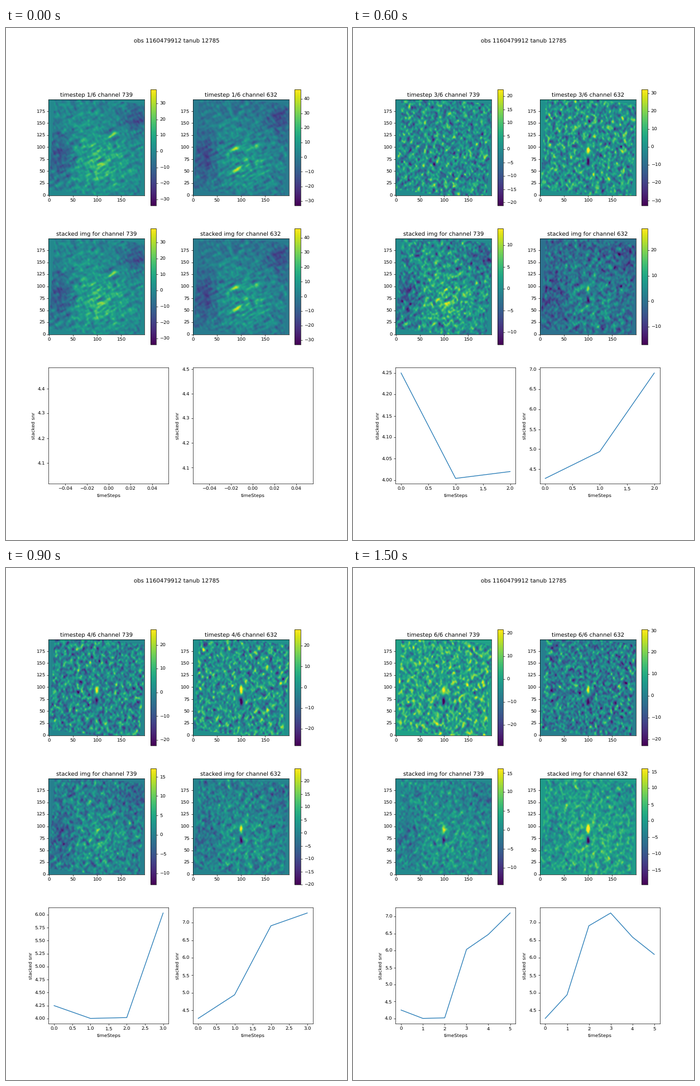
These frames come from a looping animation (611x917 px, 1800 ms). A matplotlib script:

```python
import numpy as np
import matplotlib.pyplot as plt
from matplotlib.animation import FuncAnimation

plt.rcParams["text.hinting"] = "none"

N = 200
STEPS = 6
DPI = 61.1

# Plotted ratio, colour limits of both maps, brightest streaks of the first step
CHANNELS = {
    739: dict(snr=(4.25, 4.004, 4.02, 6.031, 6.471, 7.102),
              step=((-33.8, -23.3, -21.1, -22.3, -22.8, -29.0),
                    (38.7, 19.6, 22.5, 26.5, 27.3, 21.6)),
              stack=((-33.8, -18.2, -12.8, -12.9, -12.2, -14.4),
                     (38.7, 18.5, 13.8, 17.1, 16.8, 16.2)),
              streaks=((134, 126),)),
    632: dict(snr=(4.27, 4.943, 6.91, 7.275, 6.588, 6.095),
              step=((-33.1, -25.1, -32.6, -28.1, -27.3, -22.7),
                    (46.5, 33.4, 32.2, 27.9, 24.2, 30.6)),
              stack=((-33.1, -20.2, -16.9, -20.0, -21.0, -19.4),
                     (46.5, 26.9, 28.4, 24.9, 19.6, 15.9)),
              streaks=((88, 97), (130, 101), (92, 53))),
}

yy, xx = np.mgrid[:N, :N].astype(float)

# Field of view: a slightly rotated square, zero outside
inside = ((yy > 12 - 0.125 * xx) & (xx > 0.065 * (yy - 12))
          & (yy < 189 + 0.125 * (199 - xx)) & (xx < 200 - 0.065 * (150 - yy)))


def rotate(x, y, angle):
    t = np.radians(angle)
    return x * np.cos(t) + y * np.sin(t), y * np.cos(t) - x * np.sin(t)


def bump(x, y, sx, sy, angle=0):
    u, v = rotate(xx - x, yy - y, angle)
    return np.exp(-0.5 * ((u / sx) ** 2 + (v / sy) ** 2))


def noise(rng, angle, along=3.0, across=1.6):
    """Smooth random field of unit spread, stretched along the angle."""
    f = np.fft.fftfreq(N)
    fx, fy = np.meshgrid(f, f)
    u, v = rotate(fx, fy, angle)
    band = np.exp(-2 * np.pi ** 2 * ((along * u) ** 2 + (across * v) ** 2))
    band *= 1.1 - np.exp(-(fx ** 2 + fy ** 2) / 0.03 ** 2)
    field = np.fft.ifft2(np.fft.fft2(rng.normal(size=(N, N))) * band).real
    return field / field.std()


def first_step(rng, streaks):
    """Bright glow and two dark clouds, crossed by slanted fringes."""
    glow = bump(108, 65, 42, 38)
    img = 13 * glow + 4 * bump(75, 140, 30, 25) - 2
    img -= 14 * bump(25, 80, 18, 32) + 13 * bump(180, 160, 16, 17)
    img += 3 * noise(rng, 120) + (2.5 + 4 * glow) * noise(rng, 28, 4.5, 1.9)
    for x, y in streaks:
        img += 30 * bump(x, y, 7, 2.6, 28)
        for side in (-1, 1):
            img -= 14 * bump(x - 4 * side, y + 9 * side, 7, 3, 28)
    return img


def later_step(rng, low, high, snr):
    """Crossed grain with a bright and a dark spot as strong as the ratio."""
    grain = sum(noise(rng, a) for a in (50, 90, 130)) / np.sqrt(3)
    strength = np.clip((snr - 4) / 2.3, 0, 1)
    core = strength * bump(100, 83, 6, 22)
    img = 0.125 * (high - low) * grain * (1 - 0.7 * core)
    img += 1.2 * strength * (high * bump(100, 94, 2.4, 6)
                             + low * bump(100, 71, 2.4, 6))
    return img


def make_steps(number, c):
    rng = np.random.default_rng(number)
    imgs = [first_step(rng, c["streaks"])]
    imgs += [later_step(rng, c["step"][0][k], c["step"][1][k], c["snr"][k])
             for k in range(1, STEPS)]
    return [inside * img for img in imgs]


images = {number: make_steps(number, c) for number, c in CHANNELS.items()}

fig = plt.figure(figsize=(10.0001, 15.0083), dpi=DPI)


def show_map(pos, img, low, high, title):
    ax = fig.add_subplot(3, 2, pos)
    im = ax.imshow(img, origin="lower", vmin=low, vmax=high)
    ax.set_title(title)
    fig.colorbar(im, ax=ax)


def draw(i):
    fig.clf()
    # Keeps edges on whole pixels at this resolution
    fig.subplots_adjust(right=0.8995, wspace=0.202)
    fig.suptitle("obs 1160479912 tanub 12785")
    for col, (number, c) in enumerate(CHANNELS.items(), 1):
        imgs = images[number]
        show_map(col, imgs[i], c["step"][0][i], c["step"][1][i],
                 f"timestep {i + 1}/{STEPS} channel {number}")
        show_map(col + 2, np.mean(imgs[:i + 1], axis=0),
                 c["stack"][0][i], c["stack"][1][i],
                 f"stacked img for channel {number}")
        ax = fig.add_subplot(3, 2, col + 4)
        ax.plot(range(i + 1), c["snr"][:i + 1])
        ax.set_xlabel("timeSteps")
        ax.set_ylabel("stacked snr")
    return []


anim = FuncAnimation(fig, draw, frames=STEPS, init_func=lambda: draw(0),
                     interval=300, repeat=True, repeat_delay=0)
plt.show()
```
